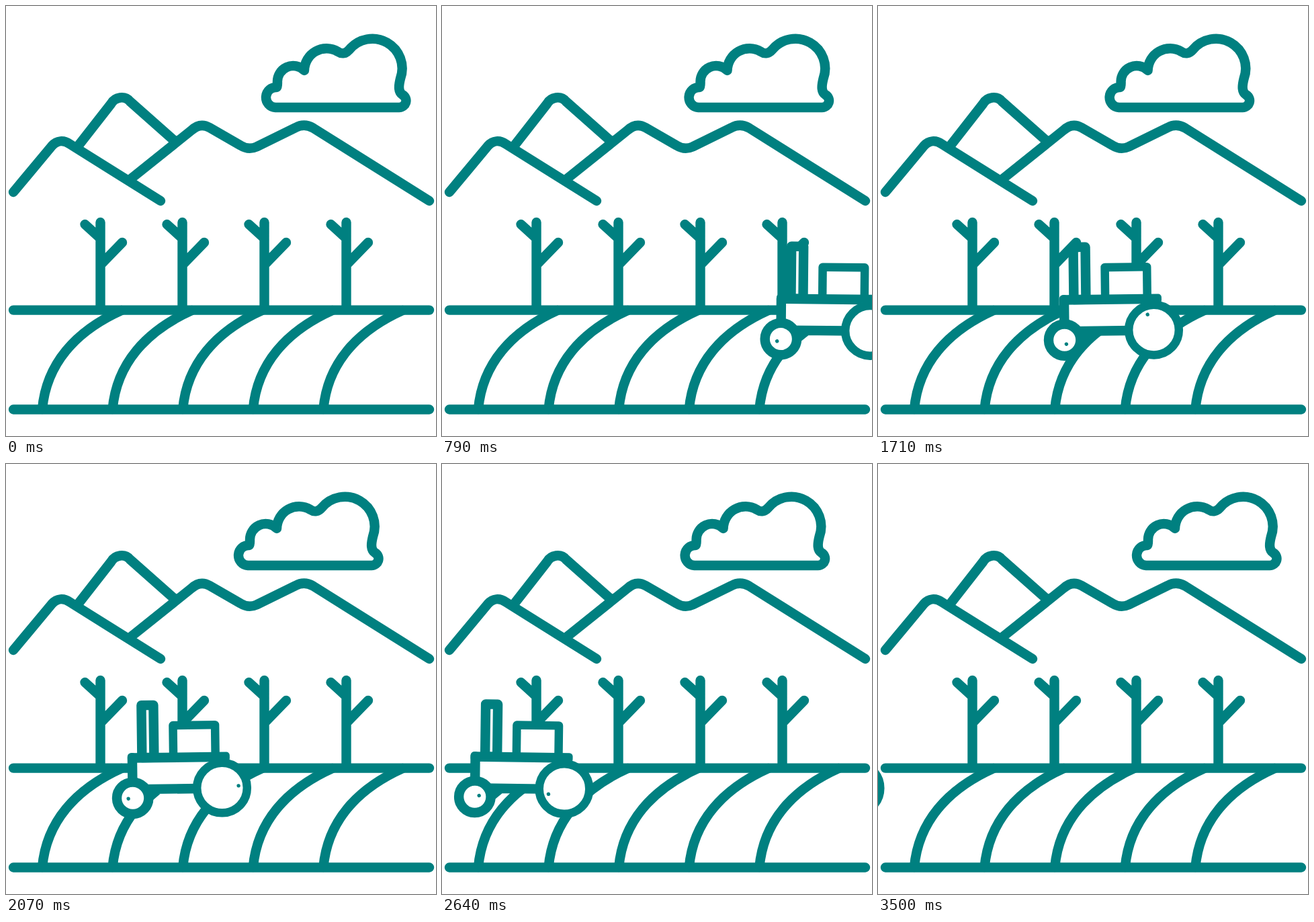
An HTML page for the animation above (3.57 s loop, 640 by 640 pixels).

```html
<!DOCTYPE html>
<html lang="en">
<head>
<meta charset="utf-8">
<title>Tractor in the field</title>
<style>
  html, body { margin: 0; width: 100%; height: 100%; overflow: hidden; background: #fff; }
  svg { display: block; width: 100vw; height: 100vh; }
  .line { fill: none; stroke: #008080; stroke-width: 14.4; stroke-linecap: round; stroke-linejoin: round; }
  .solid { fill: #fff; }
  .thin { stroke-width: 12.5; }
  .plain { stroke: none; }
  .teal { fill: #008080; stroke: none; }
</style>
</head>
<body>
<svg viewBox="0 0 640 640">
  <defs>
    <path id="tree" d="M140.5 322V450M117.5 325L140.5 346M173 352L140.5 385.5"/>
    <path id="furrow" d="M54 600C60 533 103 484 172 453"/>
  </defs>

  <g class="line">
    <path id="cloud" d="M401 151A15 15 0 0 1 403 121Q404 120 404 114A23.4 23.4 0 0 1 444 96
      A33 33 0 0 1 494 68Q503 74 511 65A44.3 44.3 0 0 1 587 108
      C584 120 584 128 590 132C600 138 595 151 585 151Z"/>
    <path d="M106 210L156 146C162 135 177 133 184.5 142L250 200"/>
    <path d="M11 277L68.5 208C75.5 200 86 199 95 205.5L230 290"/>
    <path d="M183.5 259L276 185Q289 173 303 181L349 207.5Q361 215 373 209.5L431 181Q444 174 457 181.5L630 290"/>
    <path d="M11 452.6H630M11 600.5H630"/>
    <use href="#tree"/>
    <use href="#tree" x="122"/>
    <use href="#tree" x="244"/>
    <use href="#tree" x="366"/>
    <use href="#furrow"/>
    <use href="#furrow" x="104.6"/>
    <use href="#furrow" x="209.2"/>
    <use href="#furrow" x="313.8"/>
    <use href="#furrow" x="418.4"/>
  </g>

  <!-- drawn around the front axle at 0,0 -->
  <g id="tractor" class="line">
    <path class="solid plain" d="M0 -60H118V-13H0Z"/>
    <rect class="solid" x="14.5" y="-138" width="18" height="78"/>
    <rect class="solid thin" x="61.2" y="-107.5" width="62.6" height="47.5"/>
    <path d="M0 -60V-20M10 -13H100M36 -11L24 -1"/>
    <rect class="teal" x="-7" y="-67" width="152" height="14.5" rx="5"/>
    <circle class="solid" r="23.7"/>
    <circle class="solid thin" cx="133" cy="-13.5" r="37.3"/>
    <circle id="frontDot" class="teal" cx="6.6" r="2.7"/>
    <circle id="rearDot" class="teal" cx="24.8" r="2.7"/>
  </g>
</svg>
<script>
  const LOOP = 3570, FRAMES = 50, AXLE_Y = 496.3;
  // [step, front axle x]: a slightly uneven drive to the left
  const drive = [[0, 699], [11, 504.5], [17, 396], [24, 277.5], [29, 188.5],
                 [32, 128.5], [37, 49], [50, -185]];
  const el = id => document.getElementById(id);
  const cloud = el('cloud'), tractor = el('tractor');
  const frontDot = el('frontDot'), rearDot = el('rearDot');
  const place = (node, value) => node.setAttribute('transform', value);

  function along(points, k) {
    const i = Math.max(1, points.findIndex(p => p[0] >= k));
    const [k0, x0] = points[i - 1], [k1, x1] = points[i];
    return x0 + (x1 - x0) * (k - k0) / (k1 - k0);
  }

  function pose(k) {
    const drift = -Math.min(1.765 * k, 1.95 * (FRAMES - k));
    const phase = (k - 24) / 5.3 * 2 * Math.PI + 0.44;
    const tilt = -0.75 * Math.cos(phase);
    place(cloud, `translate(${drift} 0)`);
    place(tractor, `translate(${along(drive, k)} ${AXLE_Y}) rotate(${tilt} 76 -14)`);
    place(frontDot, `rotate(${21.3 * k - 85})`);
    place(rearDot, `translate(133 -13.5) rotate(${20.95 * k - 254.2})`);
  }

  // 14 steps a second, each starting on a whole 10 ms
  function stepAt(ms) {
    return Math.floor((Math.floor(ms / 10) + 0.5) * 0.14);
  }

  const start = performance.now();
  function tick() {
    pose(stepAt((performance.now() - start) % LOOP));
    requestAnimationFrame(tick);
  }
  tick();
</script>
</body>
</html>
```
